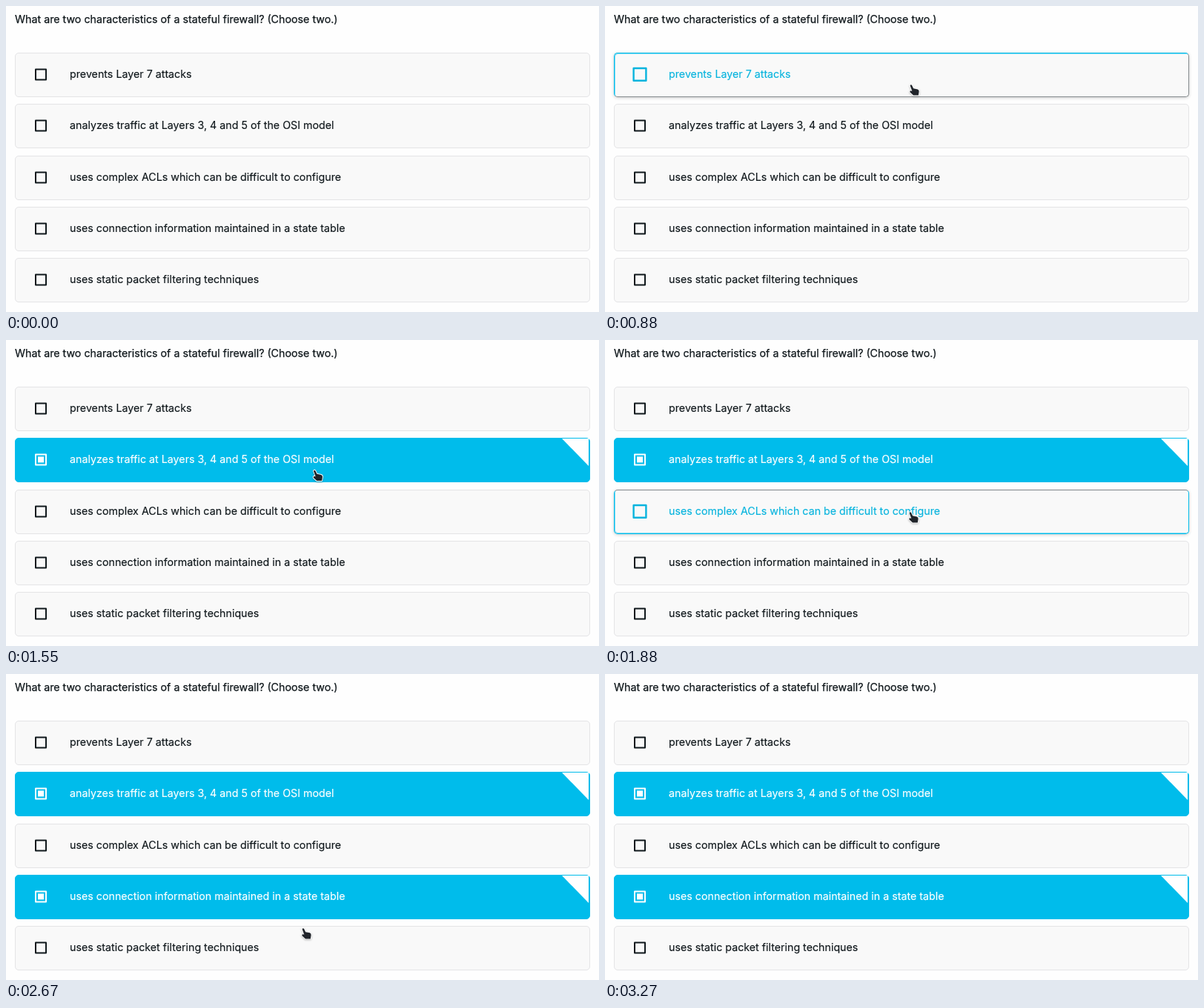
These frames come from a looping animation (800 by 413 pixels, 4.3 s). An HTML page:

```html
<!DOCTYPE html>
<html lang="en">
<head>
<meta charset="utf-8">
<title>Firewall quiz</title>
<style>
  html, body { margin: 0; width: 100%; height: 100%; overflow: hidden; background: #fefefe; }
  #stage { position: relative; width: 800px; height: 413px; overflow: hidden;
    font: 14.25px/20px Inter, sans-serif; color: #10181c; -webkit-text-stroke: .15px; }
  #stage > p { position: absolute; left: 12px; top: 8px; margin: 0; white-space: nowrap;
    -webkit-text-stroke: .25px; }

  .row {
    --hover: 0%; --picked: 0%; --zoom: 1; --inner: 1px;
    --cyan: #00bceb;
    --edge: color-mix(in srgb, color-mix(in srgb, #e4e4e6, var(--cyan) var(--hover)), var(--cyan) var(--picked));
    --shade: color-mix(in srgb, color-mix(in srgb, #e4e4e6, #858b8e var(--hover)), var(--cyan) var(--picked));
    --ink: color-mix(in srgb, color-mix(in srgb, #10181c, #08b4de var(--hover)), #fff var(--picked));
    position: absolute; left: 12px; width: 776px; height: 60px; box-sizing: border-box;
    border: 1px solid var(--edge); border-radius: 5px;
    background: color-mix(in srgb, #f9f9f9, var(--cyan) var(--picked));
    box-shadow: 0 1px 4px color-mix(in srgb, transparent, rgba(0, 0, 0, .2) var(--hover)),
      inset 1px var(--inner) color-mix(in srgb, transparent, rgba(0, 188, 235, .5) var(--hover));
    color: var(--ink);
  }
  .row.low { border-right-color: var(--shade); border-bottom-color: var(--shade); }
  .row.high { --inner: -1px; border-top-color: var(--shade); }
  .row span { position: absolute; left: 73px; top: 18px; white-space: nowrap; }
  .row i { position: absolute; left: 26px; top: 20px; width: 16px; height: 16px;
    box-sizing: border-box; border: 2px solid var(--ink); border-radius: 1px;
    transform: translateY(.4px) scale(var(--zoom)); }
  .row i::after { content: ""; position: absolute; inset: 2px;
    background: color-mix(in srgb, transparent, #fff var(--picked)); }
  .row::after { content: ""; position: absolute; right: 1px; top: 0; width: 36px; height: 37px;
    clip-path: polygon(0 0, 100% 0, 100% 100%);
    background: color-mix(in srgb, transparent, #fff var(--picked)); }

  #hand { position: absolute; left: 0; top: 0; overflow: visible; }
  #hand path { fill: #20242a; stroke: #fff; stroke-width: 1.8; stroke-linejoin: round; paint-order: stroke;
    filter: drop-shadow(0 1px 1px rgba(0, 0, 0, .25)); }
</style>
</head>
<body>
<div id="stage">
  <p>What are two characteristics of a stateful firewall? (Choose two.)</p>
  <svg id="hand" width="1" height="1">
    <path d="M-5.4 -7Q-4.3 -8.8 -3 -7.3L-.9 -3L4.8 -1.8Q7 -1 6.6 1.6L5.8 6.3H-1L-5.6 2Q-6.2 0 -4.2 .2L-2.7 .6Z"/>
  </svg>
</div>
<script>
  const LOOP = 4300, FADE = 100, LAG = 40, ROW_HEIGHT = 60, TIP = 8;

  // Pointer path: time, x, y
  const path = [
    [150, 398, -10], [880, 417, 114], [1210, 421, 175], [1500, 421, 175], [1880, 416, 240],
    [2210, 408, 303], [2400, 408, 303], [2670, 405, 351], [3150, 401, 425]
  ];

  const answers = [
    { top: 63, text: "prevents Layer 7 attacks", edge: "low" },
    { top: 132, text: "analyzes traffic at Layers 3, 4 and 5 of the OSI model", click: 1110 },
    { top: 202, text: "uses complex ACLs which can be difficult to configure", edge: "high" },
    { top: 271, text: "uses connection information maintained in a state table", edge: "low", click: 2255 },
    { top: 340, text: "uses static packet filtering techniques" }
  ];

  const stage = document.getElementById("stage");
  const hand = document.getElementById("hand");
  const clamp = v => Math.min(1, Math.max(0, v));
  const mix = (a, b, k) => a + (b - a) * k;
  const ramp = (t, start, length = FADE) => clamp((t - start) / length);

  function pointerAt(t) {
    const i = Math.max(1, path.findIndex(p => p[0] >= t));
    const [a, b] = [path[i - 1], path[i]];
    const k = clamp((t - a[0]) / (b[0] - a[0]));
    return [mix(a[1], b[1], k), mix(a[2], b[2], k)];
  }

  function timeAtHeight(y) {
    const i = path.findIndex(p => p[2] >= y);
    const [a, b] = [path[i - 1], path[i]];
    return mix(a[0], b[0], (y - a[2]) / (b[2] - a[2]));
  }

  for (const answer of answers) {
    const row = answer.row = document.createElement("div");
    row.className = "row " + (answer.edge || "");
    row.style.top = answer.top + "px";
    const label = document.createElement("span");
    label.textContent = answer.text;
    row.append(document.createElement("i"), label);
    stage.insertBefore(row, hand);
    answer.enter = timeAtHeight(answer.top + TIP) + LAG;
    answer.leave = timeAtHeight(answer.top + ROW_HEIGHT + TIP) + LAG;
  }

  function draw(t) {
    const [x, y] = pointerAt(t);
    const visible = t >= path[0][0] && t <= path[path.length - 1][0];
    hand.style.display = visible ? "" : "none";
    hand.style.transform = `translate(${x}px, ${y}px)`;

    for (const { row, enter, leave, click = Infinity } of answers) {
      const hover = ramp(t, enter) * (1 - ramp(t, leave));
      const picked = ramp(t, click, 40);
      const press = ramp(t, click - 60, 90);
      row.style.setProperty("--hover", hover * (1 - picked) * 100 + "%");
      row.style.setProperty("--picked", picked * 100 + "%");
      row.style.setProperty("--zoom", 1 + 0.2 * hover * (1 - press));
    }
  }

  const began = performance.now();
  function tick() {
    draw((performance.now() - began) % LOOP);
    requestAnimationFrame(tick);
  }
  tick();
</script>
</body>
</html>
```
